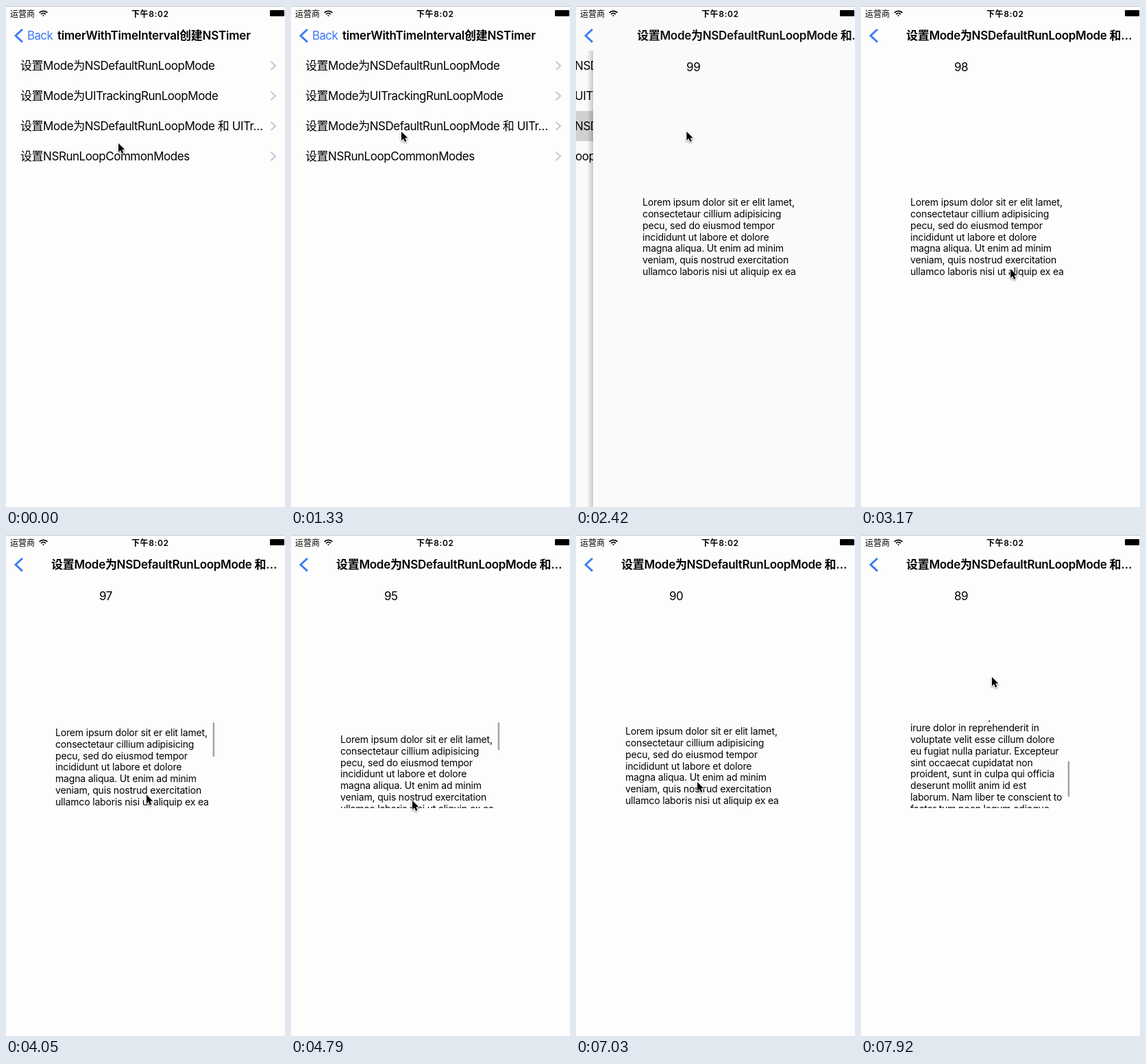
Animation, 407 px wide and 730 px high, one loop 8000 ms. Source, as an HTML page with a canvas:

```html
<!DOCTYPE html>
<html lang="zh-CN">
<head>
<meta charset="utf-8">
<style>
html, body { margin: 0; width: 100%; height: 100%; overflow: hidden; background: #fdfdfd; }
canvas { display: block; }
</style>
</head>
<body>
<canvas id="stage" width="407" height="730"></canvas>
<script>
const g = document.getElementById('stage').getContext('2d');
const W = 407, H = 730, SCREEN = 414, LOOP = 8000, STEP = 148, PUSH = 2124;
const FAMILY = 'Inter, "Noto Sans CJK SC", "Noto Sans CJK", sans-serif';
const BLUE = '#3a7af5';
const MODE = '设置Mode为NSDefaultRunLoopMode 和';
const ROWS = ['设置Mode为NSDefaultRunLoopMode', '设置Mode为UITrackingRunLoopMode',
  MODE + ' UITr…', '设置NSRunLoopCommonModes'];
const LOREM = `Lorem ipsum dolor sit er elit lamet,
consectetaur cillium adipisicing
pecu, sed do eiusmod tempor
incididunt ut labore et dolore
magna aliqua. Ut enim ad minim
veniam, quis nostrud exercitation
ullamco laboris nisi ut aliquip ex ea
commodo consequat. Duis aute
irure dolor in reprehenderit in
voluptate velit esse cillum dolore
eu fugiat nulla pariatur. Excepteur
sint occaecat cupidatat non
proident, sunt in culpa qui officia
deserunt mollit anim id est
laborum. Nam liber te conscient to
factor tum poen legum odioque
civiuda.`.split('\n');

// smooth 0 to 1 between two times
function ease(t, from, to) {
  const u = Math.min(1, Math.max(0, (t - from) / (to - from)));
  return u * u * (3 - 2 * u);
}

// the pointer taps a row, circles while dragging the text, then flicks upwards
function gesture(t) {
  const rise = ease(t, 140, 880), tap = ease(t, 1180, 1630), travel = ease(t, 2280, 3160);
  const flick = ease(t, 7310, 7896);
  const angle = (t - 4788) / 850 * 2 * Math.PI;
  const circle = ease(t, 3000, 3160) * (1 - ease(t, 5800, 6430));
  const drag = ease(t, 3170, 3600) * (1 - ease(t, 5080, 6430));
  return {
    x: 164 - 3 * rise - 3 * tap + 50 * travel - 31 * ease(t, 3160, 4788) + 20 * circle * Math.sin(angle) + 14 * flick,
    y: 199 - 17 * rise - 13 * tap + 190 * travel + 27 * circle * Math.cos(angle) - 153 * flick,
    scroll: drag * (20 - 31.6 * Math.cos(angle)) + 139 * flick,
  };
}

function text(s, x, y, { size = 17, weight = 400, gap = -0.45, color = '#000', alpha = 1 } = {}) {
  if (alpha <= 0) return;
  g.globalAlpha = alpha;
  g.font = `${weight} ${size}px ${FAMILY}`;
  g.letterSpacing = gap + 'px';
  g.fillStyle = color;
  g.fillText(s, x, y);
  g.globalAlpha = 1;
}

function box(x, y, w, h, color) {
  g.fillStyle = color;
  g.fillRect(x, y, w, h);
}

function pill(x, y, w, h, r, color) {
  g.fillStyle = color;
  g.beginPath();
  g.roundRect(x, y, w, h, r);
  g.fill();
}

// arrow head: dx and dy from the tip to both ends
function chevron(x, y, dx, dy, width, color) {
  g.strokeStyle = color;
  g.lineWidth = width;
  g.beginPath();
  g.moveTo(x + dx, y - dy);
  g.lineTo(x, y);
  g.lineTo(x + dx, y + dy);
  g.stroke();
}

function statusBar() {
  box(0, 0, W, 1, '#c9c9c9');
  text('运营商', 6, 16, { size: 12, gap: 0 });
  text('下午8:02', 183, 16, { size: 12, gap: 0.6, weight: 600 });
  g.strokeStyle = '#000';
  g.lineWidth = 1.7;
  for (let r = 1.2; r < 9; r += 3.4) {
    g.beginPath();
    g.arc(54.5, 15.3, r, -Math.PI * 0.76, -Math.PI * 0.24);
    g.stroke();
  }
  pill(385, 6, 21, 9, 1, '#000');
}

function navBar(p) {
  chevron(14, 43.3, 10, 9.3, 2.8, BLUE);
  const fade = 1 - 2 * p;
  const title = { weight: 600, gap: -0.22 };
  text('Back', 31 - 44 * p, 49, { gap: -0.65, color: BLUE, alpha: fade });
  text('timerWithTimeInterval创建NSTimer', 75 - 32 * p, 49, { ...title, alpha: fade });
  text(MODE + '…', 66 + 381 * (1 - p), 49, { ...title, gap: -0.3, alpha: p });
}

function list(shift, selected) {
  if (selected) box(0, 153, W, 44, '#d1d1d1');
  ROWS.forEach((row, i) => {
    const y = 87 + i * 44;
    text(row, 21 - shift, y + 6);
    chevron(393 - shift, y, -6.5, 6, 2, '#c7c7cc');
  });
}

function detail(x, bg, count, scroll, bar) {
  const shade = g.createLinearGradient(x - 9, 0, x, 0);
  shade.addColorStop(0, 'rgba(0,0,0,0)');
  shade.addColorStop(1, 'rgba(0,0,0,.2)');
  if (x > 0.5) box(x - 9, 65, 9, H, shade);
  box(x, 65, W, H, bg);
  text(String(count), x + 136, 95);
  g.save();
  g.beginPath();
  g.rect(x + 67, 270, 240, 128);
  g.clip();
  LOREM.forEach((s, i) => text(s, x + 72, 291.4 + i * 16.75 - scroll, { size: 14, gap: -0.17 }));
  if (bar) {
    const length = 52 + Math.min(0, scroll);
    pill(x + 301.7, 273 + Math.max(0, scroll) * 122 / 300, 2.5, length, 1.2, '#a2a2a2');
  }
  g.restore();
}

const ARROW = new Path2D('M0 0V15L3.5 11.8L6 17.4L8.6 16.3L6.2 10.8H10.8Z');

function pointer(x, y) {
  g.save();
  g.translate(x, y + 1);
  g.scale(0.86, 0.86);
  g.shadowColor = 'rgba(0,0,0,.4)';
  g.shadowBlur = 3;
  g.shadowOffsetY = 1.5;
  g.strokeStyle = '#fff';
  g.lineWidth = 2;
  g.lineJoin = 'round';
  g.stroke(ARROW);
  g.shadowColor = 'transparent';
  g.fillStyle = '#000';
  g.fill(ARROW);
  g.restore();
}

function draw(now) {
  const clock = now % LOOP;
  const start = clock < PUSH ? 0 : PUSH;
  const frame = Math.floor((clock - start) / STEP);
  const t = start + frame * STEP;

  // critically damped push, one screen wide
  const w = Math.max(0, t - 2044) * 0.012;
  const p = t < 2800 ? 1 - (1 + w) * Math.exp(-w) : 1;
  const bg = p > 0 && p < 0.99 ? '#fafafa' : '#fdfdfd';
  const { x, y, scroll } = gesture(t);

  box(0, 0, W, H, bg);
  if (p < 1) list(SCREEN * 0.3 * p, t >= 1920);
  if (p > 0) {
    const count = Math.min(99, 98 - Math.floor((frame - 7) / 3.22));
    const bar = (t > 3500 && t < 6560) || t > 7440;
    detail(SCREEN * (1 - p), bg, count, scroll, bar);
  }
  statusBar();
  navBar(p);
  pointer(x, y);
}

const origin = performance.now();
function tick() {
  draw(performance.now() - origin);
  requestAnimationFrame(tick);
}
tick();
</script>
</body>
</html>
```
